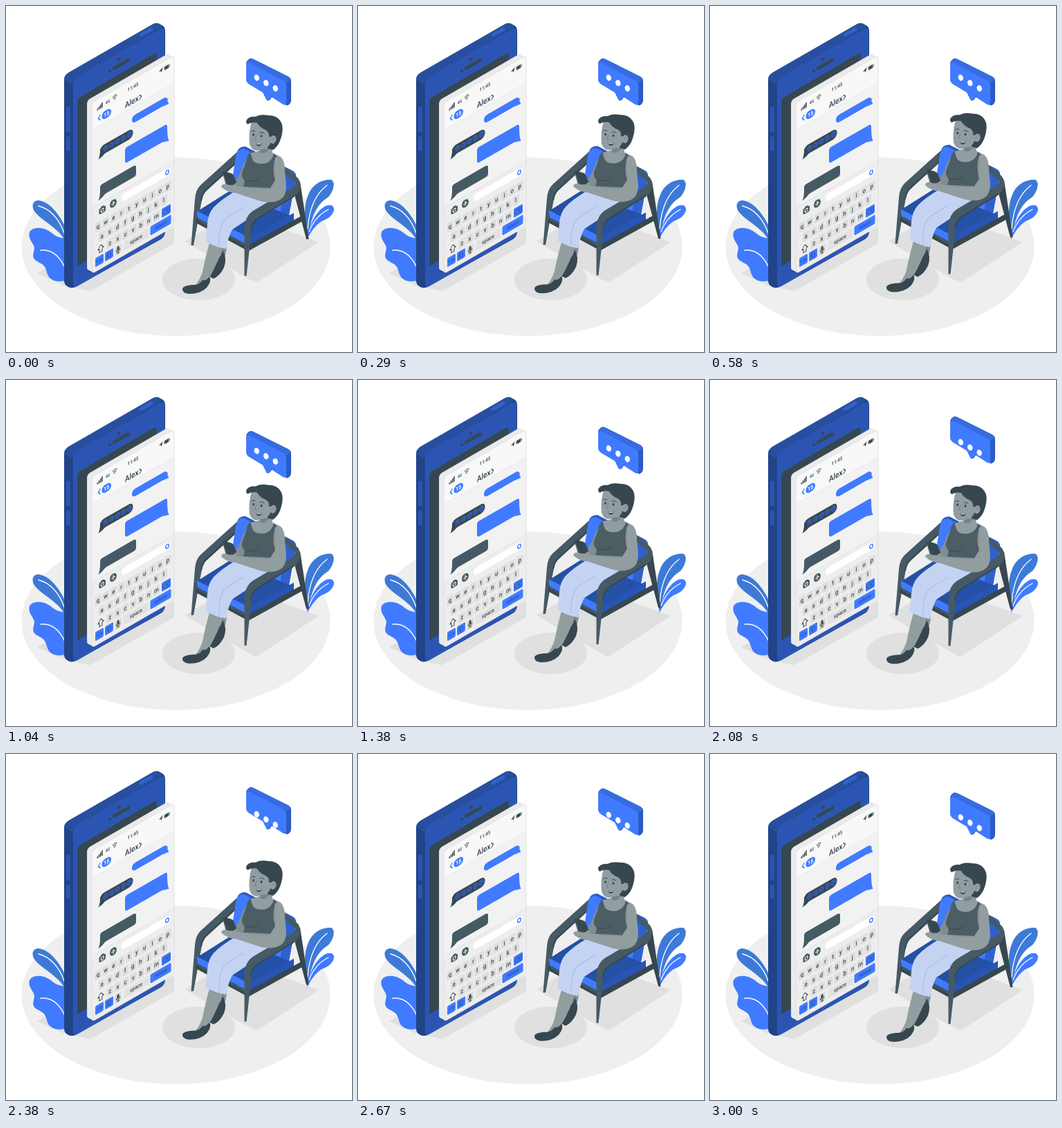
An HTML page with a canvas that plays this animation: 500 px wide and 500 px high, repeating every 3.04 s.

```html
<!DOCTYPE html>
<html lang="en">
<head>
<meta charset="utf-8">
<title>Chat</title>
<style>
html, body { margin: 0; width: 100%; height: 100%; overflow: hidden; background: #fff; }
canvas { display: block; width: 500px; height: 500px; }
</style>
</head>
<body>
<canvas id="stage"></canvas>
<script>
const LOOP = 3040;
const BLUE = '#407bff', NAVY = '#284fa5', LEAF = '#3d7ad8';
const DARK = '#37474f', SLATE = '#455a64', SKIN = '#929da0', TROUSERS = '#c5d3f3';
const canvas = document.getElementById('stage');
const ctx = canvas.getContext('2d');
const ratio = window.devicePixelRatio || 1;
canvas.width = canvas.height = 500 * ratio;

// Bubble rise: time, height
const RISE = [[0, 0], [560, 0], [1040, 2], [1670, 14], [2080, 23], [2450, 28], [3000, 20], [3040, 19]];

function fill(d, color) {
  ctx.fillStyle = color;
  ctx.fill(new Path2D(d));
}

function line(d, color, width, cap = 'round') {
  ctx.strokeStyle = color;
  ctx.lineWidth = width;
  ctx.lineCap = cap;
  ctx.lineJoin = 'round';
  ctx.stroke(new Path2D(d));
}

function oval(x, y, rx, ry, color, turn = 0) {
  ctx.fillStyle = color;
  ctx.beginPath();
  ctx.ellipse(x, y, rx, ry, turn, 0, Math.PI * 2);
  ctx.fill();
}

function box(x, y, w, h, r, color) {
  ctx.fillStyle = color;
  ctx.beginPath();
  ctx.roundRect(x, y, w, h, r);
  ctx.fill();
}

// Text on the isometric plane
function text(s, x, y, size, color = DARK, weight = 500) {
  ctx.save();
  ctx.translate(x, y);
  ctx.scale(0.866, 1);
  ctx.font = `${weight} ${size}px Roboto, "Liberation Sans", sans-serif`;
  ctx.textAlign = 'center';
  ctx.textBaseline = 'alphabetic';
  ctx.fillStyle = color;
  ctx.fillText(s, 0, 0);
  ctx.restore();
}

// Smooth curve through key points, level at both turns
function track(keys, t) {
  let i = 0;
  while (i < keys.length - 2 && t > keys[i + 1][0]) i++;
  const slope = k => {
    const a = keys[Math.max(k - 1, 0)], b = keys[Math.min(k + 1, keys.length - 1)];
    return k < 2 || k === 5 ? 0 : (b[1] - a[1]) / (b[0] - a[0]);
  };
  const [t0, v0] = keys[i], [t1, v1] = keys[i + 1];
  const d = t1 - t0, u = (t - t0) / d, w = 1 - u;
  return v0 * (1 + 2 * u) * w * w + slope(i) * d * u * w * w
    + v1 * u * u * (3 - 2 * u) - slope(i + 1) * d * u * u * w;
}

function floor() {
  oval(245.5, 348, 223, 129, '#efefef');
  fill('M45 386L84 365V404ZM97 407L122 412L243 343V320L120 385Z', '#e0e0e0');
  fill('M258 340L330 297L452 341L362 400L346 392Z', '#e0e0e0');
  oval(278.5, 395, 52.5, 30, '#e0e0e0');
}

function leftPlant() {
  fill('M85 318C76 300 64 284 48 281C38 280 36 290 42 298C54 312 72 318 85 338Z', LEAF);
  line('M47 289C64 293 77 308 84 328', '#fff', 1.3);
  fill('M86 336C78 335 72 333 66 328C56 319 38 318 34 327C31 336 40 343 41 349C41 355 37 361 41 366C46 371 52 371 56 377C60 384 59 391 66 395C72 399 79 398 88 397Z', BLUE);
  line('M50 353C66 351 78 362 86 380', '#fff', 1.3);
}

function rightPlant() {
  fill('M435 332C430 310 430 285 439 268C446 255 460 250 470 251C477 255 473 268 466 276C450 286 441 302 437 334Z', LEAF);
  line('M464 259C448 271 438 293 436 322', '#fff', 1.3);
  fill('M435 337C438 317 447 298 460 290C467 286 474 287 474 294C473 302 465 308 456 311C447 317 441 326 435 337Z', BLUE);
  line('M466 294C452 301 443 313 438 326', '#fff', 1.3);
}

function phone() {
  fill('M84 108Q84 100 91 96L211 27Q217 23 222 26L227 29Q230 31 230 37V326Q230 333 224 337L102 405Q96 409 90 406L87 404Q84 402 84 396Z', '#214388');
  fill('M84 106Q84 100 91 96L211 27Q217 23 222 26L227 29L104 103Q97 107 97 114Z', '#284f9f');
  fill('M97 114Q97 106 104 102L219 35Q229 29 229 38V327Q229 333 224 336L103 405Q97 408 97 400Z', '#2c55b3');
  line('M90 148V180M90 191V207', '#2b55b1', 5.5);
  line('M195 42L210 33.5', '#3361c8', 5);
  fill('M103 140Q103 134 108 131L212 70Q218 66 218 73V310L103 376Z', DARK);
  line('M156 90L177 78', DARK, 4.6);
  oval(163.5, 77, 2.3, 2.4, DARK);
  oval(150, 94, 1.8, 2, DARK);
}

function key(x, y, w, color) {
  box(x - w / 2, y - 6.5, w, 13, 1.8, color);
}

function keyRow(letters, x, y) {
  [...letters].forEach((c, i) => {
    key(x + i * 11.2, y, 9.4, '#dedede');
    text(c, x + i * 11.2, y + 2.8, 9);
  });
}

function keyboard() {
  box(0, 152, 119, 95, [0, 0, 5, 5], '#ededed');
  line('M0 152H119', '#e0e0e0', 0.7);

  box(10.5, 159.5, 9.5, 8.5, 2, SLATE);
  box(13, 157.8, 4.5, 4, 1, SLATE);
  oval(15.2, 163.8, 2.6, 2.9, '#f0f0f0');
  oval(15.2, 163.8, 1.5, 1.8, SLATE);
  oval(31, 163.2, 4.9, 5.6, SLATE);
  line('M28.5 163.2H33.5M31 160.3V166.1', '#fff', 1.2);
  box(43, 157.7, 71, 11, 5, '#fff');
  oval(109, 163.2, 3.1, 3.6, BLUE);
  oval(109, 163.2, 1.7, 2, '#fff');

  keyRow('qwertyuiop', 9, 184);
  keyRow('asdfghjkl', 14.5, 201);
  keyRow('zxcvbnm', 26.2, 218);
  line('M13 212.5L8.7 218H11V223H15V218H17.3Z', DARK, 1);
  key(107.5, 218, 13, BLUE);
  line('M102.5 218L105 214.5H112V221.5H105ZM107 216.3L110 219.7M110 216.3L107 219.7', NAVY, 0.8);

  key(11, 234, 12, BLUE);
  key(25, 234, 12, BLUE);
  text('123', 11, 236.3, 6, NAVY);
  oval(25, 234, 3.4, 3.9, NAVY);
  oval(25, 234, 2.6, 3, BLUE);
  oval(23.9, 233, 0.5, 0.7, NAVY);
  oval(26.1, 233, 0.5, 0.7, NAVY);
  line('M23.6 235.2Q25 236.8 26.4 235.2', NAVY, 0.6);
  key(38, 234, 10, '#dedede');
  line('M38 230.5V234', DARK, 3);
  line('M35.2 233.7Q35.4 237 38 237Q40.6 237 40.8 233.7M38 237V239.2M36.3 239.2H39.7', DARK, 0.9);
  key(64, 234, 36, '#e2e2e2');
  text('space', 64, 236.5, 7.7);
  key(99.5, 234, 30, BLUE);
  text('return', 99.5, 236.5, 7.7, NAVY);
}

function header() {
  box(0, 0, 119, 40, [5, 5, 0, 0], '#f8f8f8');
  line('M0 40H119', '#e8e8e8', 0.7);
  for (let i = 0; i < 4; i++) box(7.5 + i * 2.2, 13 - i * 1.7, 1.6, 2.5 + i * 1.7, 0.3, DARK);
  text('4G', 23, 13.8, 6.2);
  line('M30.2 9.8Q33.2 6.4 36.2 9.8M31.5 11.8Q33.2 9.8 34.9 11.8', DARK, 1);
  oval(33.2, 13.6, 0.8, 0.9, DARK);
  text('11:45', 59.5, 13.8, 7.2);
  fill('M97 11L102.5 7.5L100.7 14.5L99.8 11.6Z', DARK);
  box(104.5, 8.2, 7.4, 5.6, 1.2, '#75838a');
  box(105.4, 9.2, 5, 3.6, 0.6, DARK);
  line('M112.7 10.3V11.8', DARK, 0.8);

  line('M12 24.5L9.4 28L12 31.5', BLUE, 1.5);
  box(14.5, 22.5, 13.5, 11.5, 5.5, BLUE);
  text('15', 21.2, 31.2, 8.2, '#fff', 700);
  text('Alex', 57.7, 35.6, 11.8);
  line('M69 28.6L71.7 31.8L69 35', DARK, 1.2);
}

function messages() {
  box(58, 53, 51, 11, 5.3, BLUE);
  fill('M103 56H109.5Q109 62 111.5 65.5Q106 65 102 63.8Z', BLUE);
  box(48, 93, 61, 22.5, 3.5, BLUE);
  fill('M102 98H109Q109 114 111.5 119Q106 117.5 102 115.5Z', BLUE);
  box(12, 70.5, 47.5, 13.5, 6, DARK);
  fill('M18 74H12Q12.5 82 9.5 87Q15 87 19 83.9Z', DARK);
  box(12, 126, 52, 16.5, 3.5, SLATE);
  fill('M18 131H12Q12.5 141 9.5 147Q15 146 20 142.4Z', SLATE);
  for (let i = 0; i < 5; i++) {
    const x = 20 + i * 8.6, y = 77;
    oval(x, y, 3.6, 4.1, '#3560bd');
    oval(x - 1.3, y - 1, 0.6, 0.8, '#263d6c');
    oval(x + 1.3, y - 1, 0.6, 0.8, '#263d6c');
    line(`M${x - 1.6} ${y + 1.2}Q${x} ${y + 3} ${x + 1.6} ${y + 1.2}`, '#263d6c', 0.8);
  }
}

function sheet() {
  ctx.save();
  ctx.transform(1, -0.577, 0, 1, 124, 140);
  for (let i = 7; i > 0; i--) {
    box(-i, -i * 1.1, 119, 247, 5, i === 7 ? '#e0e0e0' : '#ebebeb');
  }
  box(0, 0, 119, 247, 5, '#f2f2f2');
  header();
  messages();
  keyboard();
  ctx.strokeStyle = '#dcdcdc';
  ctx.lineWidth = 0.8;
  ctx.beginPath();
  ctx.roundRect(0, 0, 119, 247, 5);
  ctx.stroke();
  ctx.restore();
}

function chairBack() {
  // Far arm and leg
  fill('M267.5 346L273 279Q274 265 282 258L334 211L338 223L292 265Q284 271 283 280L271 346Z', SLATE);
  line('M282 281Q284 270 291 264L337 222', DARK, 2);
  // Back cushion
  fill('M334 211Q336 203 346 203L414 238Q420 241 419 248L409 301L398 309L326 272Z', '#2d59bd');
  fill('M332 218Q334 205 344 206L397 235Q405 239 403 248L396 305L324 270Z', BLUE);
  fill('M403 246Q404 240 399 236L414 239Q420 242 419 248L409 302L396 306Z', '#2f61ce');
  // Seat
  fill('M276 297L322 268L412 303L352 337Z', '#2450a6');
  fill('M276 296Q275 306 281 309L352 348V335Z', BLUE);
  fill('M351 334L416 299V312L351 348Z', '#2854b4');
  line('M278 311L350 350L426 308', DARK, 7.5);
  line('M279 309.5L349 347.5', SLATE, 2.5);
}

function chairFront() {
  fill('M414 262L425 254L437.5 337H434Z', DARK);
  fill('M344.5 390L344.5 322Q345 304 357 296L411 264Q418 260 418 255L403 242V233L419 246Q426 251 425 262Q424 270 416 275L364 307Q356 312 355 322L347.5 390Z', SLATE);
  line('M354 324Q355 313 363 307.5L416 275', DARK, 2);
}

function legs() {
  fill('M303 340L319 346Q319 358 313 368L306 388L297 387L302 367Z', '#818d91');
  fill('M294 391Q303 380 305 364Q310 366 313 353Q320 364 315 378Q309 390 300 394Z', DARK);
  fill('M296 335L314 346Q309 364 301 379L291 398L272 405Q280 397 284 384Q288 363 296 335Z', SKIN);
  fill('M255 408Q257 404 269 403Q279 404 284 396Q289 398 294 391Q298 397 290 407Q281 416 265 416Q254 415 255 408Z', DARK);
  fill('M334 266Q310 280 300 291Q292 300 291 315L288.5 340Q301 348 318 351Q321 334 327 323L371 294Q387 284 382 267Z', TROUSERS);
  line('M308 345Q307 324 314 311Q322 303 344 291', '#aebfe4', 1.3);
}

function torso() {
  fill('M350 220Q342 227 339 240L331 254L317 254L316 262L337 267L350 250Z', '#818d91');
  fill('M367 199L384 201L385 212L397 218Q403 224 403 238L385 244L349 230L353 213L366 209Z', SKIN);
  fill('M353 211Q348 216 347 225L341 241Q340 249 345 252L343 264Q360 276 384 274L390 249Q388 238 391 217L387 213Q385 225 373 228Q358 229 356 221Z', '#4c5d64');
  line('M345 252Q355 256 365 250', DARK, 1);
  fill('M367 205L380 207Q375 215 367 212Z', '#76848a');
}

function arm() {
  fill('M389 219Q398 217 402 230Q404 248 405 260Q405 275 396 280Q385 286 368 282L331 270Q316 268 311 261Q312 256 319 258L338 261L382 263L389 252Q384 237 389 219Z', SKIN);
  line('M389 226Q387 241 389 250', '#7d898e', 0.8);
  line('M350 263L382 264', '#7d898e', 0.8);
  fill('M313 242Q312 239 316 239L326 242Q328 243 329 245L334 257Q333 260 329 260L320 258Q318 257 317 255Z', DARK);
  line('M314 243L319 256', '#56686f', 1);
  line('M322 264Q328 262 333 257M320 261L327 260', SKIN, 3);
}

function head() {
  fill('M380 184L399 180Q398 199 386 208L378 206Z', DARK);
  fill('M355 167Q350 184 352 200Q355 209 363 209Q373 207 380 202L386 190L384 169Z', SKIN);
  fill('M349 171Q345 167 349 163Q354 159 361 160Q367 156 379 158Q392 158 397 167Q401 173 399 184Q397 194 390 199Q383 199 384 189L380 189Q381 182 375 179Q367 176 363 169Q356 167 349 171Z', DARK);
  oval(386, 193, 4.5, 6, SKIN, 0.25);
  line('M384.5 194Q385.5 190 388.5 190.5', '#75838a', 0.8);
  oval(357.6, 186, 1.4, 1.9, DARK);
  oval(369, 188, 1.4, 1.9, DARK);
  line('M354.5 181.2Q357 179 360 181M367 183Q370 181.5 373 184', DARK, 1);
  line('M361.5 187L359.5 193.5L362 194', '#6f7c82', 0.9);
  fill('M361 198Q366 200 370 198Q368 204 363 202Z', DARK);
  line('M362.5 199.2Q366 200.4 368.5 199.2', '#fff', 0.9);
}

function speech(rise) {
  ctx.save();
  ctx.translate(0, -rise);
  fill('M347 84Q347 79 352 76Q354 75 358 77L408 102Q412 104 412 108V136Q412 142 406 144L393 134L352 107Z', '#2c5bc4');
  fill('M348 80L353 76Q355 75 358 77L408 102Q411 104 411 107L405 111Z', '#366ce0');
  fill('M347 85Q347 80 352 82L401 108Q405 110 405 115V139Q405 145 400 142L383 131L377 137L371 125L351 113Q347 110 347 106Z', BLUE);
  fill('M377 137L383 131L386 129L381 136Z', '#2c5bc4');
  ctx.restore();
  for (let i = 0; i < 3; i++) {
    oval(362.3 + i * 13.5, 103.6 + i * 7.7 - rise * 0.6, 3.6, 4.6, '#fff', -0.35);
  }
}

function draw(now) {
  const t = now % LOOP;
  ctx.setTransform(ratio, 0, 0, ratio, 0, 0);
  ctx.fillStyle = '#fff';
  ctx.fillRect(0, 0, 500, 500);
  floor();
  leftPlant();
  rightPlant();
  phone();
  sheet();

  ctx.save();
  ctx.translate(0, -4.1 * (1 - Math.cos(t / LOOP * Math.PI * 2)));
  chairBack();
  legs();
  torso();
  chairFront();
  arm();
  head();
  ctx.restore();

  speech(track(RISE, t));
}

const start = performance.now();
function tick() {
  draw(performance.now() - start);
  requestAnimationFrame(tick);
}
tick();
</script>
</body>
</html>
```
